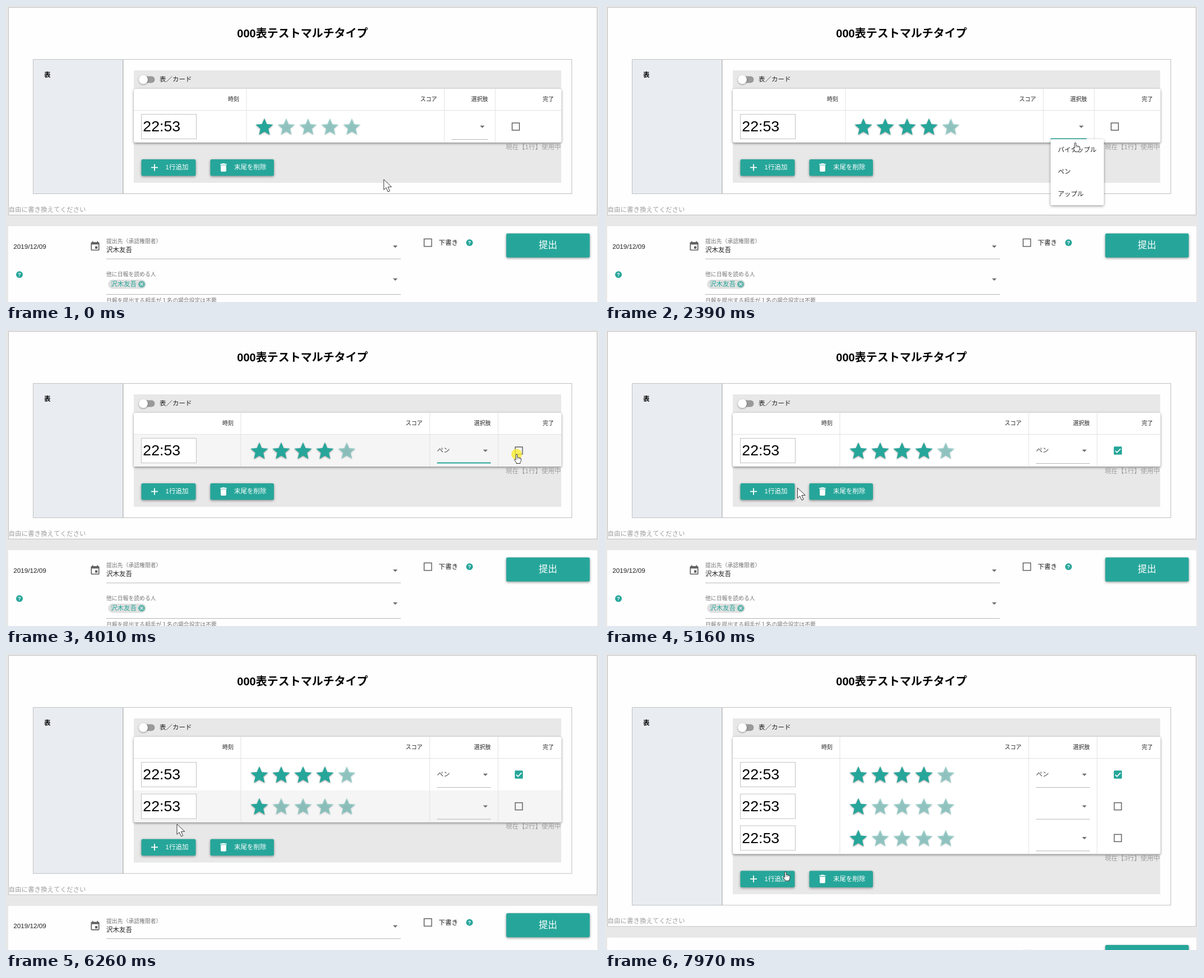
These frames come from a looping animation (1058 by 529 pixels, 8000 ms). An HTML page with a canvas:

```html
<!DOCTYPE html>
<html lang="ja">
<head>
<meta charset="utf-8">
<title>表テスト</title>
<style>
html, body { margin: 0; width: 100%; height: 100%; overflow: hidden; background: #e8e8e8; }
canvas { display: block; width: 100%; height: 100%; }
</style>
</head>
<body>
<canvas id="stage" width="1058" height="529"></canvas>
<script>
const ctx = document.getElementById('stage').getContext('2d');
const LOOP = 8000, TICK = 77.3;
const TEAL = '#26a69a', INK = '#212121', GREY = '#9e9e9e', LINE = '#c2c2c2';
const FONT = '"Liberation Sans", "Noto Sans CJK JP", "Noto Sans CJK", sans-serif';
const PERSON = '沢木友吾';
const ROW = 56.7, LOADING_ROW = 39.3, ROW_TOP = 187;

const STAR = new Path2D('M12 17.27L18.18 21l-1.64-7.03L22 9.24l-7.19-.61L12 2 9.19 8.63 2 9.24l5.46 4.73L5.82 21z');
const CALENDAR = new Path2D('M17 12h-5v5h5zM16 1v2H8V1H6v2H5a2 2 0 0 0-2 2v14a2 2 0 0 0 2 2h14a2 2 0 0 0 2-2V5a2 2 0 0 0-2-2h-1V1zM19 19H5V8h14z');
const TRASH = new Path2D('M6 19a2 2 0 0 0 2 2h8a2 2 0 0 0 2-2V7H6zM19 4h-3.5l-1-1h-5l-1 1H5v2h14z');
const ARROW = new Path2D('M0 0V18.5L4.2 14.6L7.6 22L10.7 20.6L7.4 13.4L13.8 13.2Z');
const HAND = new Path2D('M-1.3 1Q0-.6 1.3 1V6Q2.6 5 3.7 6.2Q5 5.6 6 6.8Q7.6 6.4 8 8V11.5Q7.6 13.4 6.4 14.6V16.5H-.6V14.8L-4 10.4Q-4.2 8.6-2.8 9L-1.3 10.2Z');

// time, x, y, pointing hand
const PATH = [
  [0, 674, 310, 0], [70, 674, 310, 0], [780, 580, 233, 1], [1230, 568, 223, 1],
  [1850, 568, 224, 1], [2000, 650, 224, 0], [2180, 842, 226, 1], [2320, 840, 236, 1],
  [2390, 839, 244, 1], [2620, 836, 280, 1], [2780, 836, 292, 1], [3150, 836, 292, 1],
  [3400, 866, 262, 0], [3780, 911, 222, 1], [4100, 911, 222, 1], [4200, 880, 226, 0],
  [4700, 517, 265, 0], [5090, 345, 282, 0], [5160, 325, 284, 1], [5240, 314, 285, 1],
  [5560, 314, 285, 0], [5850, 314, 285, 0], [6260, 305, 304, 0], [6480, 309, 326, 1],
  [6640, 312, 334, 1], [7110, 312, 334, 0], [7570, 312, 311, 0], [7730, 313, 330, 0],
  [7880, 320, 378, 0], [7955, 322, 389, 1], [8000, 322, 389, 1]
];
const CLICKS = [1300, 2200, 3080, 4010, 5480, 6950];

const within = (t, a, b) => t >= a && t < b;

function cursorAt(t) {
  let i = 0;
  while (i < PATH.length - 2 && t >= PATH[i + 1][0]) i++;
  const [t0, x0, y0, hand] = PATH[i], [t1, x1, y1] = PATH[i + 1];
  const p = (t - t0) / (t1 - t0), e = p * p * (3 - 2 * p);
  return { x: x0 + (x1 - x0) * e, y: y0 + (y1 - y0) * e, hand };
}

function text(s, x, y, size = 11.5, color = INK, align = 'left', weight = '') {
  ctx.font = `${weight} ${size}px ${FONT}`;
  ctx.textAlign = align;
  ctx.fillStyle = color;
  ctx.fillText(s, x, y);
}

function rect(x, y, w, h, color) {
  ctx.fillStyle = color;
  ctx.fillRect(x, y, w, h);
}

function frame(x, y, w, h, color = LINE, width = 1) {
  ctx.strokeStyle = color;
  ctx.lineWidth = width;
  ctx.strokeRect(x, y, w, h);
}

function round(x, y, w, h, r, color) {
  ctx.fillStyle = color;
  ctx.beginPath();
  ctx.roundRect(x, y, w, h, r);
  ctx.fill();
}

function disc(x, y, r, color) {
  ctx.fillStyle = color;
  ctx.beginPath();
  ctx.arc(x, y, r, 0, 7);
  ctx.fill();
}

function line(points, color, width) {
  ctx.strokeStyle = color;
  ctx.lineWidth = width;
  ctx.beginPath();
  points.forEach(([x, y]) => ctx.lineTo(x, y));
  ctx.stroke();
}

function shaded(draw, blur = 4, dy = 1.5, alpha = 0.4) {
  ctx.save();
  ctx.shadowColor = `rgba(0,0,0,${alpha})`;
  ctx.shadowBlur = blur;
  ctx.shadowOffsetY = dy;
  draw();
  ctx.restore();
}

function icon(path, cx, cy, scale, color, rule = 'nonzero') {
  ctx.save();
  ctx.translate(cx - 12 * scale, cy - 12 * scale);
  ctx.scale(scale, scale);
  ctx.fillStyle = color;
  ctx.fill(path, rule);
  ctx.restore();
}

function caret(x, y) {
  ctx.fillStyle = '#707070';
  ctx.beginPath();
  ctx.moveTo(x - 4.2, y - 2);
  ctx.lineTo(x + 4.2, y - 2);
  ctx.lineTo(x, y + 2.2);
  ctx.fill();
}

function checkbox(x, y, size, checked) {
  const h = size / 2;
  if (!checked) return frame(x - h + 0.8, y - h + 0.8, size - 1.6, size - 1.6, '#6a6a6a', 1.6);
  round(x - h, y - h, size, size, 1.5, TEAL);
  line([[x - 4.5, y + 0.3], [x - 1.5, y + 3.3], [x + 4.8, y - 3.2]], '#fff', 1.7);
}

function help(x, y) {
  disc(x, y, 6, TEAL);
  text('?', x, y + 3.4, 9.5, '#fff', 'center', 'bold');
}

function button(x, y, w, h, color = TEAL, lift = 0) {
  shaded(() => round(x, y, w, h, 2.5, color), 4 + lift, 1.5 + lift / 2);
}

function stars(x, y, score) {
  for (let i = 0; i < 5; i++) {
    ctx.globalAlpha = i < score ? 1 : 0.4;
    shaded(() => icon(STAR, x + i * 39, y + 0.8, 1.55, TEAL), 3, 1, 0.4);
  }
  ctx.globalAlpha = 1;
}

function row(y, cols, data) {
  rect(241, y + 6, 99, 45, '#fff');
  frame(241.5, y + 6.5, 98, 44);
  text('22:53', 244.3, y + 37.2, 26.7, '#000');
  stars(cols.star, y + 28.5, data.score);
  text(data.choice, cols.field, y + 32, 11.5, '#424242');
  caret(cols.fieldEnd - 9.7, y + 28.7);
  const w = cols.fieldEnd - cols.field;
  if (data.focus) rect(cols.field, y + 49.5, w, 2, TEAL);
  else rect(cols.field, y + 51, w, 1, '#b5b5b5');
  checkbox(cols.check, y + 28.5, 14.5, data.done);
}

function backdrop(dy) {
  rect(0, 0, 1058, 529, '#e8e8e8');
  rect(4, 2, 1051, 372 + dy, '#fefefe');
  frame(4.5, 2.5, 1050, 371 + dy, '#bebebe');
  text('000表テストマルチタイプ', 529, 55.5, 20, '#000', 'center', 'bold');
  rect(49, 96, 159, 240 + dy, '#e9edf2');
  frame(48.5, 95.5, 961, 240 + dy, '#c0c0c0');
  rect(208, 96, 1.5, 240 + dy, '#b8b8b8');
  text('表', 68, 127, 11.5, '#000', 'left', 'bold');
  rect(228, 115, 762.5, 201 + dy, '#e8e8e8');
  round(240, 125.5, 25.5, 12, 6, '#9a9a9a');
  shaded(() => disc(245, 131.5, 8, '#fff'), 3, 1);
  text('表／カード', 274, 135);
  text('自由に書き換えてください', 4.5, 368 + dy, 11.5, GREY);
}

function table(t, dy, full, loading) {
  const wide = t >= 3230;
  const cols = wide
    ? { lines: [419, 756, 878], ends: [406, 743, 865, 977.5], star: 452, field: 769, fieldEnd: 865, check: 915 }
    : { lines: [429, 782, 873], ends: [416, 769, 860, 977.5], star: 461, field: 795, fieldEnd: 859.5, check: 909.5 };
  shaded(() => round(228, 148, 763, 96 + dy, 3, '#fff'), 4, 1.5, 0.45);

  if (within(t, 700, 1950)) rect(228, ROW_TOP, 763, ROW, '#fbfbfb');
  if (within(t, 3550, 4300)) rect(228, ROW_TOP, 763, ROW, '#f5f5f5');
  if (within(t, 6090, 6500)) round(228, ROW_TOP + ROW, 763, ROW, [0, 0, 3, 3], '#f5f5f5');
  if (loading) rect(228, ROW_TOP + full * ROW + 15.5, 763, 11, '#f5f5f5');

  ['時刻', 'スコア', '選択肢', '完了'].forEach((s, i) => text(s, cols.ends[i], 170, 10, INK, 'right'));
  rect(228, 186, 763, 1, '#e2e2e2');
  cols.lines.forEach(x => rect(x - 0.5, 148, 1, 39 + full * ROW, '#e2e2e2'));
  for (let i = 0; i < full; i++) {
    const first = i === 0;
    row(ROW_TOP + i * ROW, cols, {
      score: first && t >= 780 ? 4 : 1,
      choice: first && t >= 3230 ? 'ペン' : '',
      focus: first && within(t, 2200, 4090),
      done: first && t >= 4090
    });
  }
}

function actions(t, dy, count) {
  text(`現在【${count}行】使用中`, 990, 255.5 + dy, 11.5, GREY, 'right');
  const y = 274 + dy;
  const pressed = within(t, 5480, 6000) || within(t, 6950, 7400);
  const hover = within(t, 5160, 5480) || within(t, 6480, 6950);
  button(241.5, y, 97, 29.5, pressed ? '#4bb3a9' : hover ? '#38ada2' : TEAL, pressed ? 4 : 0);
  rect(259, y + 13.7, 12, 1.8, '#fff');
  rect(264.1, y + 8.6, 1.8, 12, '#fff');
  text('1行追加', 284.5, y + 18.3, 11.5, '#fff');
  button(364.5, y, 113.5, 29.5);
  icon(TRASH, 388, y + 14.6, 0.82, '#fff');
  text('末尾を削除', 407, y + 18.3, 11.5, '#fff');
}

function submitForm(dy) {
  ctx.save();
  ctx.translate(0, dy);
  rect(4, 393.5, 1051, 400, '#fefefe');
  text('2019/12/09', 13.3, 433.7, 11.7);
  icon(CALENDAR, 159, 429.5, 0.84, '#616161', 'evenodd');
  text('提出先（承認権限者）', 179, 424.3, 9.85, '#757575');
  text(PERSON, 179, 440);
  rect(179, 451.5, 525.5, 1, '#b5b5b5');
  caret(694.5, 430);
  checkbox(752.7, 423, 15, false);
  text('下書き', 772, 426.8);
  help(827, 423);
  button(892.5, 406.5, 149, 43);
  text('提出', 967, 433, 16.5, '#fff', 'center');
  help(24, 480);
  text('他に日報を読める人', 179, 483, 9.85, '#757575');
  round(182, 489, 68, 16.5, 8.2, '#e0e0e0');
  text(PERSON, 187, 501, 11.5, TEAL);
  disc(242, 497.2, 6, '#62b5ad');
  line([[239.6, 494.8], [244.4, 499.6]], '#e8e8e8', 1.3);
  line([[244.4, 494.8], [239.6, 499.6]], '#e8e8e8', 1.3);
  caret(694.5, 488.8);
  rect(179, 515, 525.5, 1, '#b5b5b5');
  text('日報を提出する相手が１名の場合設定は不要', 179, 529.5, 9.85, '#757575');
  ctx.restore();
}

function menu(t) {
  if (!within(t, 2240, 3300)) return;
  ctx.globalAlpha = t < 2310 ? 0.5 : t > 3200 ? 0.4 : 1;
  shaded(() => round(795, 238, 95, 118, 2, '#fff'), 5, 1.5);
  if (t >= 2700) rect(795, 277.3, 95, 39.3, '#eeeeee');
  ['パイナップル', 'ペン', 'アップル'].forEach((s, i) => text(s, 808, 261 + i * 39.3));
  ctx.globalAlpha = 1;
}

function cursor(t) {
  const { x, y, hand } = cursorAt(t);
  if (CLICKS.some(c => within(t, c, c + 150))) disc(x, y, 9.5, 'rgba(250,235,50,.8)');
  const shape = hand ? HAND : ARROW;
  ctx.save();
  ctx.translate(x, y);
  ctx.lineJoin = 'round';
  ctx.lineWidth = 1;
  ctx.fillStyle = '#fff';
  ctx.strokeStyle = '#333';
  ctx.fill(shape);
  ctx.stroke(shape);
  if (hand) [1.3, 3.7, 6].forEach(k => line([[k, 6.5], [k, 9]], '#555', 0.7));
  ctx.restore();
}

function draw(now) {
  const t = Math.floor((now % LOOP + 12) / TICK) * TICK;
  const full = 1 + (t >= 6090) + (t >= 7400);
  const loading = within(t, 5640, 6090) || within(t, 7180, 7400);
  const dy = (full - 1) * ROW + (loading ? LOADING_ROW : 0);
  backdrop(dy);
  table(t, dy, full, loading);
  actions(t, dy, full + loading);
  submitForm(dy);
  menu(t);
  cursor(t);
}

const start = performance.now();
function tick() {
  draw(performance.now() - start);
  requestAnimationFrame(tick);
}
tick();
</script>
</body>
</html>
```
